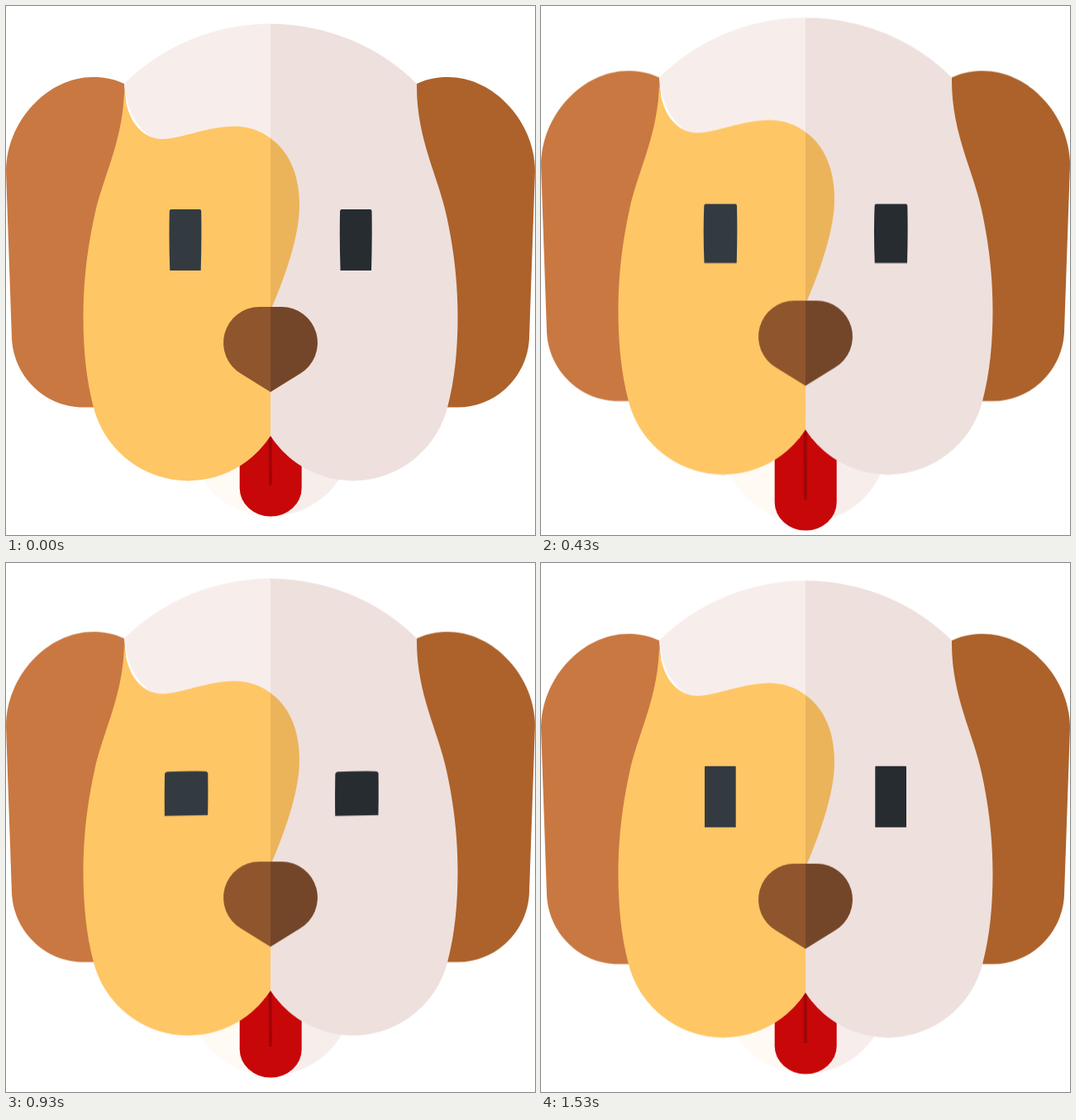
Animation, 640 px wide and 640 px high, one loop 1560 ms. Source, as an HTML page without scripts:

```html
<!DOCTYPE html>
<html lang="en">
<head>
<meta charset="utf-8">
<title>Puppy</title>
<style>
  html, body { margin: 0; width: 100%; height: 100%; overflow: hidden; background: #fff; }
  svg { display: block; width: 100vw; height: 100vh; }

  .head, .chin { animation: bob 1560ms linear infinite; }
  .head { --dir: -1px; }
  .chin { --dir: 1px; }
  .tongue { animation: pant 1560ms linear infinite; }
  .eye { animation: blink 1560ms linear infinite; }

  @keyframes bob {
    0%, 100% { transform: translateY(0); }
    10.9% { transform: translateY(calc(2.2 * var(--dir))); }
    19.2% { transform: translateY(calc(5 * var(--dir))); }
    27.56% { transform: translateY(calc(7.5 * var(--dir))); }
    30.8% { transform: translateY(calc(7.5 * var(--dir))); }
    33.97% { transform: translateY(calc(6.9 * var(--dir))); }
    49.36% { transform: translateY(calc(.7 * var(--dir))); }
    52.24% { transform: translateY(calc(.2 * var(--dir))); }
    68.59% { transform: translateY(calc(5.7 * var(--dir))); }
    76.28% { transform: translateY(calc(7.5 * var(--dir))); }
    79% { transform: translateY(calc(7.2 * var(--dir))); }
    85.26% { transform: translateY(calc(5 * var(--dir))); }
    98.08% { transform: translateY(calc(.3 * var(--dir))); }
  }

  @keyframes pant {
    0%, 100% { transform: translateY(0); }
    10.9% { transform: translateY(6.1px); }
    27.56% { transform: translateY(17px); }
    30.13% { transform: translateY(18.2px); }
    33.97% { transform: translateY(15.4px); }
    49.36% { transform: translateY(2.8px); }
    52.24% { transform: translateY(.6px); }
    68.59% { transform: translateY(10.3px); }
    80.13% { transform: translateY(18.2px); }
    85.26% { transform: translateY(13.3px); }
    98.08% { transform: translateY(.8px); }
  }

  @keyframes blink {
    0%, 10.9% { d: path("M198.3 320Q197 283 197.8 248Q198 246 200 246Q217 245.8 234.5 246Q236 246 236.2 248Q236.8 283 235.7 320Z"); }
    27.56% {
      d: path("M197.5 318.6Q196 283 197.3 249Q197.5 247 199.5 247Q217 246.8 235 247Q236.7 247 237 249Q237.8 283 236.7 318.6Z");
      animation-timing-function: ease-in-out;
    }
    44.87%, 51.28% {
      d: path("M180 286.5Q179 282 180.5 278.5Q182 274.5 188 273.6Q220 270.5 252 271.5Q260 272 261 277Q262 280 260.7 283.8Z");
      animation-timing-function: ease-in-out;
    }
    65.38%, 100% { d: path("M198 320Q198 283 198 247Q198 246 199 246Q217 246 235 246Q235.7 246 235.7 247Q235.7 283 235.7 320Z"); }
  }
</style>
</head>
<body>
<svg viewBox="0 0 640 640">
  <defs>
    <path id="ear" d="M143 94C128 87 116 86 105 86C50 86 0 140 0 200L7 402C9 448 47 485.5 93 485.5H120L160 300Z"/>
    <path id="face" d="M320 21.5A252.3 252.3 0 0 0 143 94C144 160 117 206 107 254C98 295 93.5 335 93.5 376C93.5 415 97 452 106 486A118.3 118.3 0 0 0 320 520Z"/>
    <path id="nose" d="M320 364H306.5A43.5 43.5 0 0 0 284.5 445L320 467Z"/>
    <path id="chin" d="M320 418A99.7 99.7 0 0 0 320 617.4Z"/>
  </defs>

  <g class="chin">
    <use href="#chin" fill="#fffaf4"/>
    <use href="#chin" fill="#f7eeec" transform="matrix(-1 0 0 1 640 0)"/>
  </g>

  <g class="tongue">
    <rect x="282.7" y="470" width="75" height="147.5" rx="37.5" ry="34" fill="#c80709"/>
    <path d="M317.5 490H321.5L322 580H318Z" fill="#a00607"/>
  </g>

  <g class="head">
    <use href="#ear" fill="#c97842"/>
    <use href="#ear" fill="#ac622a" transform="matrix(-1 0 0 1 640 0)"/>
    <use href="#face" fill="#eee0dd" transform="matrix(-1 0 0 1 640 0)"/>
    <path d="M320 21.5A252.3 252.3 0 0 0 143 94Q148 150 190 166H320Z" fill="#f7eeec"/>
    <path d="M143 94C144 160 117 206 107 254C98 295 93.5 335 93.5 376C93.5 415 97 452 106 486A118.3 118.3 0 0 0 320 520V160C308 150.5 292 145.5 276 145.5C245 145.5 210 161 190 161C161 161 143 133 143 94Z" fill="#ffc665"/>
    <path d="M320 160C345 178 355 208 355 242C355 275 340 322 321 366H320Z" fill="#ebb45b"/>
    <use href="#nose" fill="#8f562d"/>
    <use href="#nose" fill="#744629" transform="matrix(-1 0 0 1 640 0)"/>
    <path class="eye" fill="#333b41" d="M198 320V246H235.7V320Z"/>
    <g transform="translate(206.3)">
      <path class="eye" fill="#262c30" d="M198 320V246H235.7V320Z"/>
    </g>
  </g>
</svg>
</body>
</html>
```
